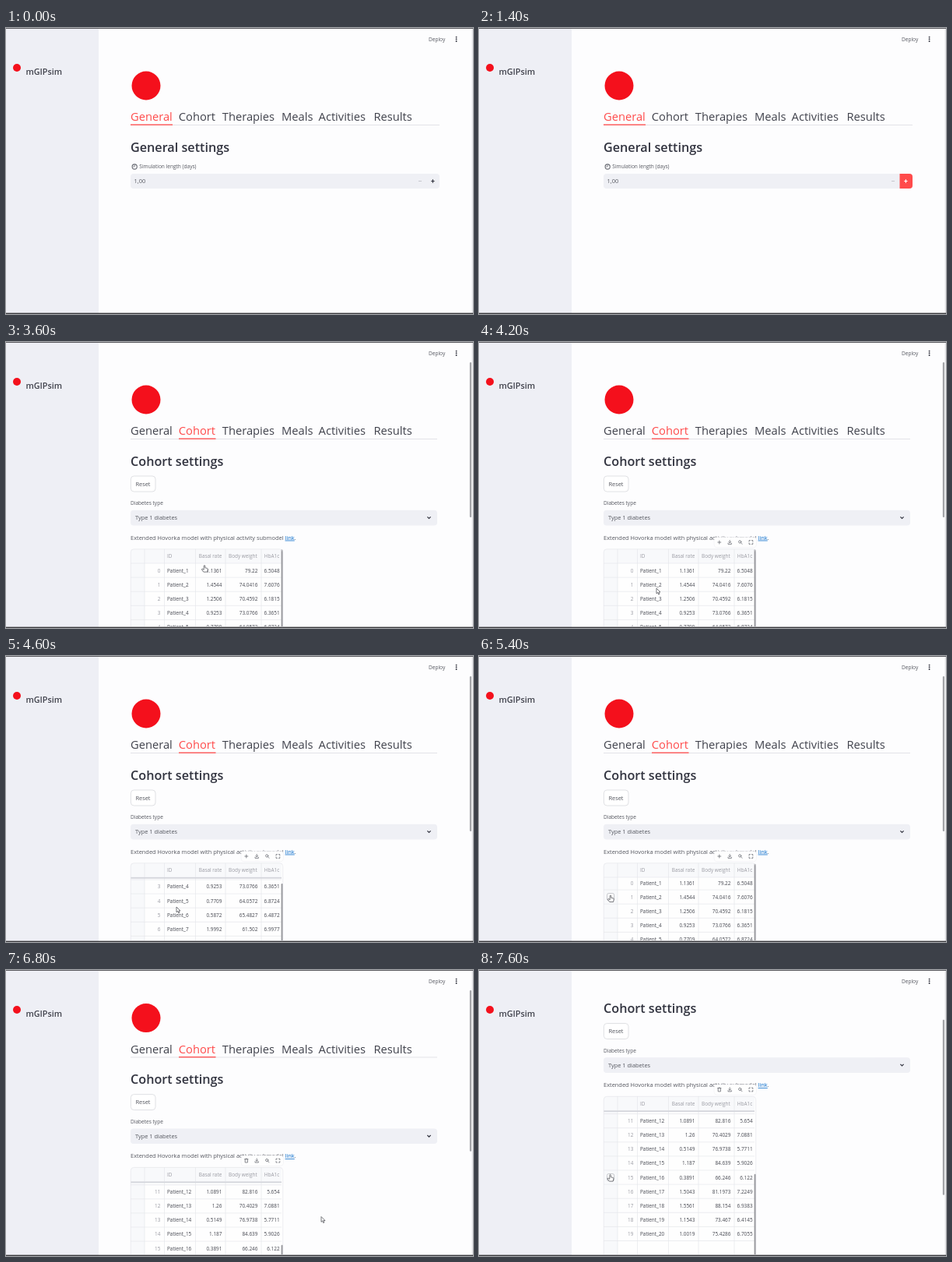
These frames come from a looping animation (600 by 367 pixels, 8000 ms). An HTML page:

```html
<!DOCTYPE html>
<html lang="en">
<head>
<meta charset="utf-8">
<title>mGIPsim</title>
<style>
html, body { margin: 0; width: 100%; height: 100%; overflow: hidden; background: #fdfdfe; }
svg { display: block; width: 100vw; height: 100vh; font-family: "Open Sans", "Noto Sans", sans-serif; }
text { fill: #55575f; white-space: pre; }
.tab { font-size: 14.7px; fill: #40424c; }
.h { font-size: 16.2px; font-weight: 600; fill: #31333f; }
.label { font-size: 6.55px; }
.body { font-size: 7.43px; }
.cell { font-size: 6.4px; fill: #44464f; }
.dim { fill: #9a9ba3; }
.end { text-anchor: end; }
.field { fill: #eff0f5; }
.grid { stroke: #e6e7eb; stroke-width: .7; fill: none; }
.icon { stroke: #6a6c74; stroke-width: .8; fill: none; stroke-linecap: round; stroke-linejoin: round; }
</style>
</head>
<body>
<svg id="stage" viewBox="0 0 600 367" preserveAspectRatio="none">
  <defs>
    <clipPath id="main"><rect x="119" y="0" width="481" height="365"/></clipPath>
    <clipPath id="table"><rect x="160" y="265.5" width="196" height="207" rx="4"/></clipPath>
    <clipPath id="rowsClip"><rect x="160" y="284" width="194" height="188"/></clipPath>
  </defs>
  <rect width="600" height="367" fill="#fdfdfe"/>

  <g clip-path="url(#main)">
    <g id="page">
      <circle cx="180" cy="74" r="18.5" fill="#f4101c"/>
      <g id="tabs"></g>

      <g id="general">
        <text class="h" x="160" y="158.7">General settings</text>
        <g class="icon">
          <circle cx="165.2" cy="178" r="3.1" stroke-width="1.1"/>
          <path d="M165.2 176V178H163.6"/>
        </g>
        <text class="label" x="171.3" y="180.3">Simulation length (days)</text>
        <rect class="field" x="160" y="187" width="397" height="19" rx="4"/>
        <text class="body" x="164.6" y="199.2" id="days"></text>
        <path id="plusBox" d="M540.5 187H553a4 4 0 0 1 4 4V202a4 4 0 0 1-4 4H540.5Z" fill="#ff4b4b"/>
        <path id="minus" d="M530 196.5h4" stroke-width="1"/>
        <path id="plus" d="M546.2 196.5h4.4M548.4 194.3v4.4" stroke-width="1.2"/>
      </g>

      <g id="cohort">
        <text class="h" x="160" y="158.7">Cohort settings</text>
        <rect x="160.4" y="172" width="31.6" height="20" rx="4" fill="#fff" stroke="#d9dade" stroke-width=".8"/>
        <text class="body" x="166.4" y="184.9">Reset</text>
        <text class="label" x="160" y="209.2">Diabetes type</text>
        <rect class="field" x="160" y="215.8" width="394" height="19.6" rx="4"/>
        <text class="body" x="166" y="228.1">Type 1 diabetes</text>
        <path d="M541.4 224.4l2.1 2.1 2.1-2.1" fill="none" stroke="#31333f" stroke-width="1.2"/>
        <text class="body" x="160" y="253.6">Extended Hovorka model with physical activity submodel <tspan fill="#0068c9" text-decoration="underline">link</tspan>.</text>

        <g clip-path="url(#table)">
          <rect x="160" y="265.5" width="196" height="207" fill="#fefefe"/>
          <g clip-path="url(#rowsClip)"><g id="rows"></g></g>
          <rect x="160" y="265.5" width="194" height="18.5" fill="#f8f9fb"/>
          <g id="head"></g>
          <path class="grid" d="M160 284H354M178 265.5V473M203.5 265.5V473M243.5 265.5V473M282 265.5V473M328 265.5V473"/>
          <rect id="shade" x="160" y="284" width="194" height="1.6" fill="#d3d5db"/>
          <rect id="tableBar" x="353.6" width="2.4" height="107" rx="1.2" fill="#97989c"/>
        </g>
        <rect class="grid" x="160.3" y="265.8" width="195.4" height="206.5" rx="4"/>

        <g id="tools">
          <rect x="302" y="250.4" width="54.5" height="13.4" rx="4" fill="#fefefe" stroke="#ededf1" stroke-width=".5"/>
          <g class="icon">
            <path id="add" d="M306.8 257h4M308.8 255v4"/>
            <path id="trash" d="M306.6 255.2h4.4M308 254.6h1.6M307.2 255.4v4h3.2v-4"/>
            <path d="M322.2 254.4v3.2M320.8 256.4l1.4 1.4 1.4-1.4M320 258.2v1.2h4.4v-1.2"/>
            <circle cx="335.2" cy="256.4" r="1.6"/>
            <path d="M336.5 257.7l1.5 1.6"/>
            <path d="M347 256v-1.4h1.4M350.4 254.6h1.4V256M351.8 258v1.4h-1.4M348.4 259.4H347V258"/>
          </g>
        </g>
      </g>
    </g>
    <rect x="119" y="0" width="481" height="26" fill="#fdfdfe"/>
    <rect id="pageBar" x="595.8" width="2.2" rx="1" fill="#a2a3a7"/>
  </g>

  <rect width="119" height="367" fill="#eeeff5"/>
  <circle cx="14" cy="51" r="5" fill="#f4101c"/>
  <text x="25.4" y="59.5" font-size="10.8" font-weight="600" style="fill:#40424c">mGIPsim</text>
  <text class="label" x="543" y="16.5">Deploy</text>
  <g fill="#31333f">
    <circle cx="578.6" cy="11.6" r=".95"/><circle cx="578.6" cy="14.3" r=".95"/><circle cx="578.6" cy="17" r=".95"/>
  </g>
  <rect x="598.6" width="1.4" height="367" fill="#e3e3e6"/>
  <rect width="600" height="1" fill="#5c5c60"/>
  <rect y="365.6" width="600" height="1.4" fill="#3c3c40"/>

  <g id="cursor" fill="#fff" stroke="#55565c" stroke-width=".8" stroke-linejoin="round">
    <path id="arrow" d="M0 0V6.8L1.6 5.4 2.7 8 3.9 7.5 2.8 5H5Z"/>
    <path id="hand" d="M-.8 .6Q0-.6 .8 .6V3.3L3.6 3.9Q4.5 4.2 4.3 5.2L3.6 8.6H-1.2L-3.6 5.4Q-3.4 4.2-2.2 4.8L-.8 5.8Z"/>
  </g>
</svg>

<script>
const LOOP = 8000, STEP = 200, ROW = 18.1, RED = '#ff4b4b';
const NS = 'http://www.w3.org/2000/svg';
const $ = id => document.getElementById(id);

function add(parent, tag, attrs, text) {
  const el = document.createElementNS(NS, tag);
  for (const k in attrs) el.setAttribute(k, attrs[k]);
  if (text !== undefined) el.textContent = text;
  return parent.appendChild(el);
}
const set = (id, attrs) => { for (const k in attrs) $(id).setAttribute(k, attrs[k]); };
const show = (id, on) => set(id, { visibility: on ? 'inherit' : 'hidden' });

// Tabs
const tabs = [['General', 160], ['Cohort', 221.8], ['Therapies', 277.8], ['Meals', 354], ['Activities', 401.6], ['Results', 472.4]]
  .map(([name, x]) => add($('tabs'), 'text', { class: 'tab', x, y: 119 }, name));
const rule = add($('tabs'), 'rect', { x: 160, y: 124, height: .8, fill: '#dcdde2' });
const mark = add($('tabs'), 'rect', { y: 123.5, height: 1.3, fill: RED });

// Patient table: basal rate, body weight, HbA1c
const patients = `1.1361 79.22 6.5048|1.4544 74.0416 7.6076|1.2506 70.4592 6.1815|0.9253 73.0766 6.3651
0.7709 64.0572 6.8724|0.5872 65.4827 6.4872|1.9992 61.502 6.9977|1.3127 77.1846 6.2713
0.8465 69.3518 7.1142|1.0734 80.2671 5.9385|1.4218 72.6093 6.5526|1.0891 82.816 5.654
1.26 70.4029 7.0881|0.5149 76.9738 5.7711|1.187 84.639 5.9026|0.3891 66.246 6.122
1.5043 81.1973 7.2249|1.5561 88.154 6.9383|1.1543 73.467 6.4145|1.0019 75.4286 6.7055`
  .split(/[|\n]/).map(s => s.trim().split(' '));

[['ID', 207], ['Basal rate', 247.8], ['Body weight', 286], ['HbA1c', 331.8]]
  .forEach(([name, x]) => add($('head'), 'text', { class: 'cell dim', x, y: 277.4 }, name));

const rows = $('rows');
add(rows, 'rect', { x: 160, y: 284, width: 18, height: ROW * 21, fill: '#f8f9fb' });
const tint = add(rows, 'rect', { x: 160, y: 284 + ROW, width: 194, height: ROW, fill: '#ffeaea' });
for (let i = 0; i <= patients.length; i++) {
  const top = 284 + i * ROW, y = top + 11.5;
  add(rows, 'path', { class: 'grid', d: `M160 ${top + ROW}H354` });
  if (i === patients.length) break;
  add(rows, 'text', { class: 'cell dim end', x: 198.4, y }, i);
  add(rows, 'text', { class: 'cell', x: 207, y }, 'Patient_' + (i + 1));
  patients[i].forEach((v, c) => add(rows, 'text', { class: 'cell end', x: [277.4, 323.4, 351.6][c], y }, v));
}
function box(i, fill, stroke) {
  const y = 284 + i * ROW + 4.6;
  return add(rows, 'rect', { x: 164.6, y, width: 9, height: 9, rx: 1.8, fill, stroke, 'stroke-width': .8 });
}
const hover = [box(1, '#fff', '#b4b5bb'), box(15, '#fff', '#b4b5bb')];
const check = add(rows, 'g', {});
check.append(box(1, RED, RED));
add(check, 'path', { d: 'M166.8 311.3l1.7 1.7 3-3.4', fill: 'none', stroke: '#fff', 'stroke-width': 1.1 });

// Motion: [time, values...], linear between points
const pointer = [[2200, 500, 180], [2800, 246, 116], [3200, 246, 116], [3600, 255, 286.5], [4200, 228, 316],
  [4600, 219, 322], [5000, 214, 320], [5400, 169, 307], [5600, 169, 307], [6000, 236, 315], [6400, 236, 315],
  [6600, 330, 318], [6800, 405, 316.5], [7200, 405, 316.5], [7600, 168.6, 262.5]];
const tableScroll = [[4200, 0], [4600, 51.3], [4800, 88], [5000, 60], [5400, 2], [6000, 2], [6200, 195]];
const pageScroll = [[6600, 0], [6800, 12.4], [7200, 103.5]];

function at(keys, t) {
  const j = keys.findIndex(k => k[0] > t);
  if (j === 0) return keys[0].slice(1);
  if (j < 0) return keys[keys.length - 1].slice(1);
  const a = keys[j - 1], b = keys[j], p = (t - a[0]) / (b[0] - a[0]);
  return a.slice(1).map((v, i) => v + (b[i + 1] - v) * p);
}
const within = (t, from, to) => t >= from && t < to;

function draw(ms) {
  const t = Math.floor((ms % LOOP) / STEP) * STEP;
  const cohort = t >= 3200, picked = t >= 5600, plusHot = within(t, 1400, 2200);
  const [scroll] = at(tableScroll, t), [page] = at(pageScroll, t), [x, y] = at(pointer, t);

  show('general', !cohort);
  show('cohort', cohort);
  set('page', { transform: `translate(0 ${-page})` });

  tabs[0].style.fill = cohort ? '' : RED;
  tabs[1].style.fill = t >= 2800 ? RED : '';
  rule.setAttribute('width', cohort ? 394 : 397);
  mark.setAttribute('x', cohort ? 222 : 160);
  mark.setAttribute('width', cohort ? 47.5 : 54);

  $('days').textContent = t < 2000 ? '1,00' : '2,00';
  show('plusBox', plusHot && !cohort);
  set('plus', { stroke: plusHot ? '#fff' : '#31333f' });
  set('minus', { stroke: t < 2000 ? '#c6c7cd' : '#31333f' });

  rows.setAttribute('transform', `translate(0 ${-scroll})`);
  tint.setAttribute('visibility', picked ? 'inherit' : 'hidden');
  check.setAttribute('visibility', picked ? 'inherit' : 'hidden');
  hover[0].setAttribute('visibility', t === 5400 ? 'inherit' : 'hidden');
  hover[1].setAttribute('visibility', t >= 7600 ? 'inherit' : 'hidden');
  show('shade', cohort && scroll > 5);
  set('tableBar', { y: 265.8 + scroll * .51 });

  show('tools', cohort && t >= 3800);
  show('add', !picked);
  show('trash', picked);

  const top = Math.max(26, page * .615);
  show('pageBar', cohort);
  set('pageBar', { y: top, height: 225 + page * .615 - top });

  const hand = within(t, 2800, 3800) || within(t, 5400, 5800) || t >= 7600;
  show('cursor', t >= 2200);
  show('arrow', !hand);
  show('hand', hand);
  set('cursor', { transform: `translate(${x} ${y})` });
}

const start = performance.now();
function tick(now) {
  draw(Math.max(0, now - start));
  requestAnimationFrame(tick);
}
draw(0);
requestAnimationFrame(tick);
</script>
</body>
</html>
```
